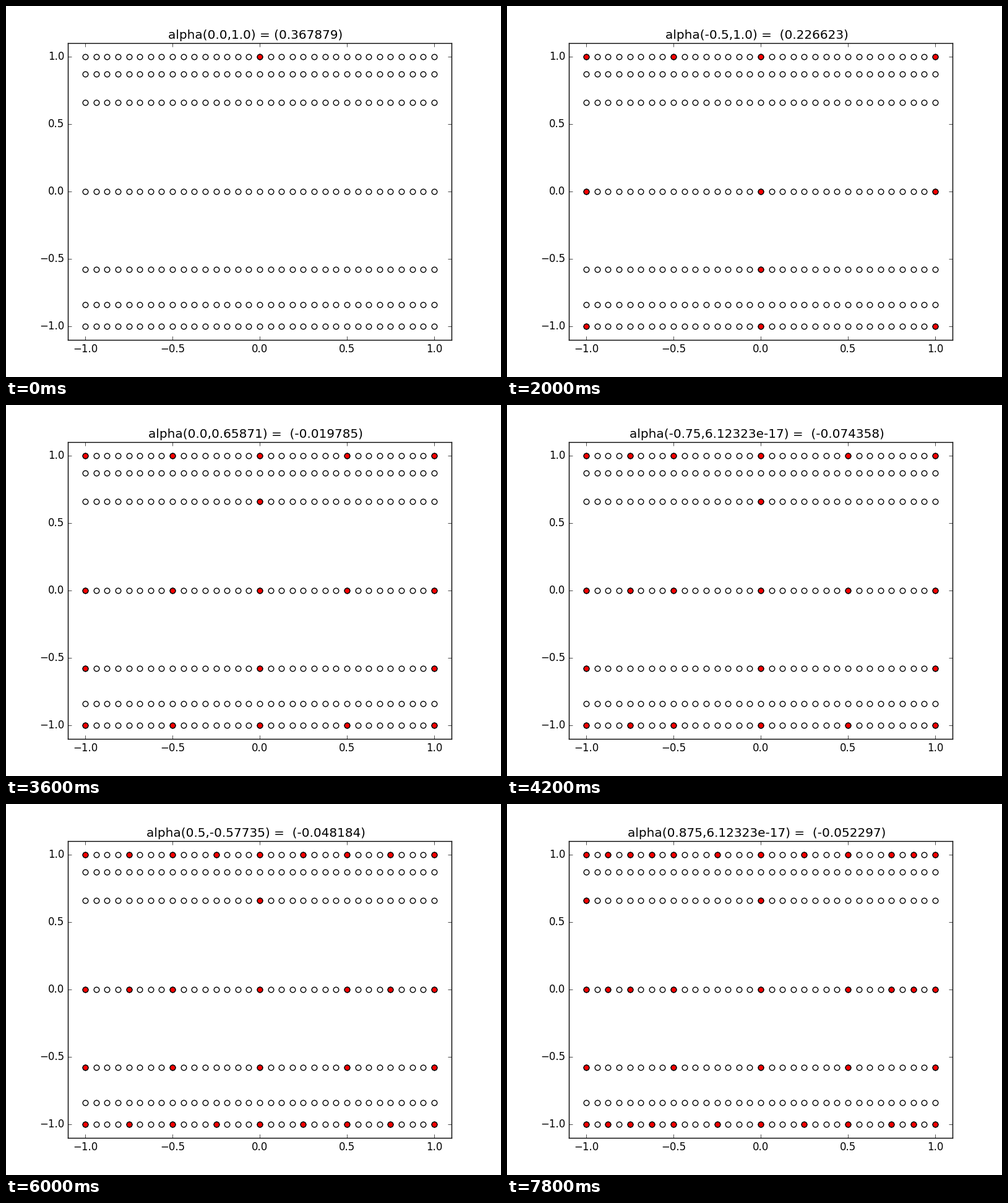
These frames come from a looping animation (800 px wide and 600 px high, 8000 ms). A matplotlib script:

```python
import math

import matplotlib.pyplot as plt
import numpy as np
from matplotlib.animation import FuncAnimation

plt.style.use("classic")
plt.rcParams.update({
    "font.family": "DejaVu Sans",
    "savefig.dpi": "figure",
    "figure.facecolor": "white",
})


def leja(n):
    """First n Leja points on [-1, 1], starting at 1."""
    grid = np.linspace(-1, 1, 200001)
    pts = [1.0]
    while len(pts) < n:
        dist = np.prod([np.abs(grid - p) for p in pts], axis=0)
        pts.append(float(grid[np.argmax(np.round(dist, 12))]))
    return pts


YS = leja(7)
YS[2] = math.cos(math.pi / 2)
XS = np.linspace(-1, 1, 33)


def surplus_x(x):
    """Hierarchical surplus of sqrt(1 - x^2) in the quadratic basis."""
    if x == 0:
        return 1.0
    value = math.sqrt(1 - x * x) - 1
    h = 1.0
    while (x / h) % 1:
        c = h * (2 * math.floor(x / (2 * h)) + 1)
        value -= surplus_x(c) * (1 - ((x - c) / h) ** 2)
        h /= 2
    return value


def surplus_y(k):
    """Surplus of exp(-y) at the k-th Leja point."""
    value = math.exp(-YS[k])
    if k:
        known = np.array(YS[:k])
        value -= np.polyval(np.polyfit(known, np.exp(-known), k - 1), YS[k])
    return value


def column(x, n):
    return [(x, k) for k in range(n)]


# Order of refinement: (x, index of the Leja row)
STEPS = (
    [(0, 0), (-1, 0), (1, 0), (0, 1), (0, 2), (-1, 1), (1, 1)]
    + [(-1, 2), (1, 2), (0, 3)]
    + column(-0.5, 3) + column(0.5, 3)
    + [(-1, 3), (1, 3), (0, 4)]
    + column(-0.75, 3) + column(-0.25, 2)
    + column(0.75, 3) + column(0.25, 2)
    + [(-0.5, 3), (0.5, 3)]
    + column(-0.875, 2) + column(-0.625, 2)
    + [(-1, 4), (-0.875, 2)]
    + column(0.875, 3)
)


def short(v):
    text = "%g" % v
    return text if "." in text else text + ".0"


def caption(i):
    x, k = STEPS[i]
    gap = "  " if i else " "
    alpha = surplus_x(x) * surplus_y(k)
    return "alpha(%s,%s) =%s(%f)" % (short(x), short(YS[k]), gap, alpha)


fig = plt.figure(figsize=(8, 6), dpi=100)
ax = fig.add_axes([0.125, 0.1, 0.775, 0.8])
ax.set_xlim(-1.1, 1.1)
ax.set_ylim(-1.1, 1.1)
ticks = [-1, -0.5, 0, 0.5, 1]
ax.set_xticks(ticks)
ax.set_yticks(ticks)

dot = dict(linestyle="none", marker="o", markersize=6.2,
           markeredgecolor="black", markeredgewidth=1)
gx, gy = np.meshgrid(XS, YS)
ax.plot(gx.ravel(), gy.ravel(), markerfacecolor="white", **dot)
chosen, = ax.plot([], [], markerfacecolor="red", **dot)
title = ax.set_title("", x=0.4897)


def draw(i):
    done = STEPS[:i + 1]
    chosen.set_data([x for x, _ in done], [YS[k] for _, k in done])
    title.set_text(caption(i))
    return chosen, title


anim = FuncAnimation(fig, draw, frames=len(STEPS), interval=200,
                     repeat=True, repeat_delay=0, blit=False)
plt.show()
```
